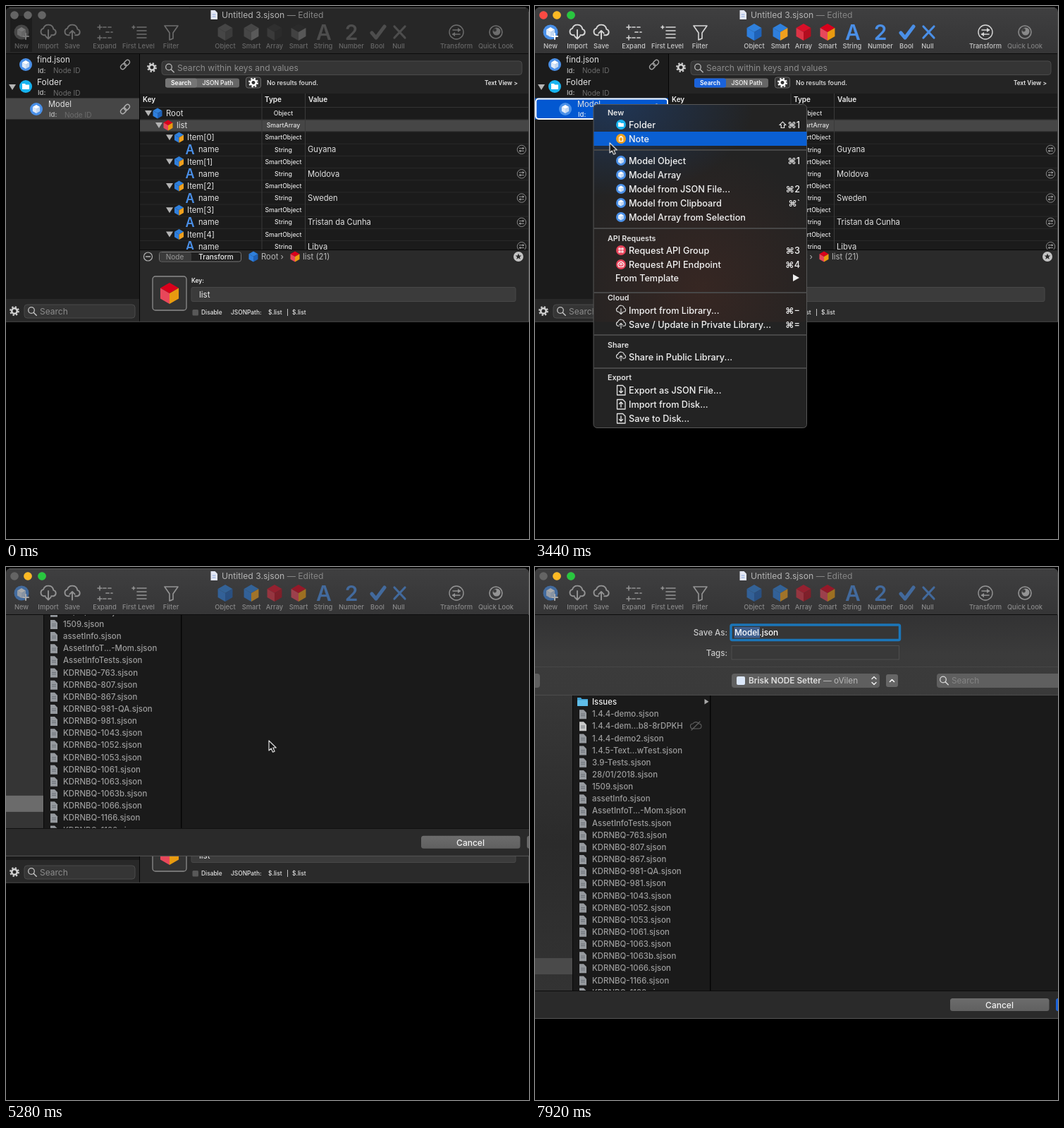
Write an HTML page that moves like this. It is 742x755 px and loops after 8000 ms.

```html
<!DOCTYPE html>
<html lang="en">
<head>
<meta charset="utf-8">
<title>Export a model</title>
<style>
html, body { margin: 0; width: 100%; height: 100%; overflow: hidden; background: #000; }
svg { display: block; width: 742px; height: 755px; font-family: Inter, "DejaVu Sans", sans-serif; white-space: pre; }

/* 1% of the loop is 80 ms */
.step { animation: 8s step-end infinite; }
.flow { animation: 8s linear infinite; }
.awake { animation-name: awake; }
.asleep { animation-name: asleep; }
.red { animation-name: red; }
.tools { animation-name: tools; }
.look { animation-name: look; }
.row { animation-name: row; }
.ring { animation-name: ring; }
.edit { animation-name: edit; }
.glow { animation-name: glow; }
.menu { animation-name: menu; }
.hover { animation-name: hover; }
.sheet { animation-name: sheet; }
.key { animation-name: key; }
.idle { animation-name: idle; }
.focus { animation-name: focus; }
.save { animation-name: save; }
.ibeam { animation-name: ibeam; }
.arrow { animation: path 8s linear infinite, arrow 8s step-end infinite; }

@keyframes awake { 0% { opacity: 0 } 14%, 100% { opacity: 1 } }
@keyframes asleep { 0% { opacity: 1 } 14%, 100% { opacity: 0 } }
@keyframes red { 0% { opacity: 0 } 14% { opacity: 1 } 64%, 100% { opacity: 0 } }
@keyframes tools {
  0% { opacity: .4; filter: grayscale(1) }
  14% { opacity: 1; filter: none }
  64%, 100% { opacity: .57; filter: none }
}
@keyframes look { 0% { opacity: 1 } 14% { opacity: .5 } 64%, 100% { opacity: 1 } }
@keyframes row { 0% { fill: #464646 } 14%, 100% { fill: #0358d1 } }
@keyframes ring { 0% { opacity: 0 } 40%, 100% { opacity: 1 } }
@keyframes edit { 0% { opacity: 0 } 21% { opacity: 1 } 30%, 100% { opacity: 0 } }
@keyframes glow {
  0%, 21% { stroke-width: 32px; stroke-opacity: .1 }
  22% { stroke-width: 19px; stroke-opacity: .32 }
  24%, 100% { stroke-width: 5px; stroke-opacity: .9 }
}
@keyframes menu { 0%, 39.99% { opacity: 0 } 40%, 56% { opacity: 1 } 58.67%, 100% { opacity: 0 } }
@keyframes hover {
  0% { opacity: 0; transform: translateY(178px) }
  43% { opacity: 1; transform: translateY(178px) }
  44% { opacity: 1; transform: translateY(229px) }
  45% { opacity: 1; transform: translateY(289px) }
  46% { opacity: 1; transform: translateY(336px) }
  47% { opacity: 1; transform: translateY(375px) }
  48% { opacity: 1; transform: translateY(440px) }
  49% { opacity: 1; transform: translateY(487px) }
  50% { opacity: 1; transform: translateY(534px) }
  54% { opacity: 0; transform: translateY(534px) }
  55%, 100% { opacity: 1; transform: translateY(534px) }
}
@keyframes sheet {
  0%, 63.5% { transform: translateY(-575px); animation-timing-function: ease-in-out }
  68%, 100% { transform: none }
}
@keyframes key { 0% { opacity: 0 } 90%, 100% { opacity: 1 } }
@keyframes idle { 0% { opacity: 1 } 90%, 100% { opacity: 0 } }
@keyframes focus {
  0%, 90% { stroke-width: 14px; stroke-opacity: .3 }
  92%, 100% { stroke-width: 3.5px; stroke-opacity: 1 }
}
@keyframes save { 0% { opacity: 0 } 99%, 100% { opacity: 1 } }
@keyframes ibeam { 0% { opacity: 0 } 20% { opacity: 1 } 30%, 100% { opacity: 0 } }
@keyframes arrow {
  0% { opacity: 0 } 3% { opacity: 1 } 20% { opacity: 0 }
  30% { opacity: 1 } 86%, 100% { opacity: 0 }
}
@keyframes path {
  0%, 3% { transform: translate(256px, 67px) }
  4%, 5% { transform: translate(237px, 67px); animation-timing-function: ease-in-out }
  12%, 20% { transform: translate(62px, 139px) }
  30% { transform: translate(66px, 131px); animation-timing-function: ease-out }
  38%, 42% { transform: translate(83px, 143px) }
  50%, 59% { transform: translate(265px, 545px); animation-timing-function: ease-in-out }
  66%, 70% { transform: translate(373px, 246px) }
  73%, 74% { transform: translate(348px, 151px) }
  75%, 76% { transform: translate(284px, 106px) }
  78% { transform: translate(304px, 92px); animation-timing-function: ease-in }
  86%, 100% { transform: translate(683px, 632px) }
}
</style>
</head>
<body>
<svg id="stage" viewBox="0 0 742 755"></svg>
<script>
const PITCH = 17.15;
const BLUE = ['#2f80dc', '#2f7fdd', '#1f62b8'];
const SMART = ['#2f80dc', '#2f7fdd', '#f0a01e'];
const RED = ['#d80f28', '#dc3446', '#b30d1f'];
const SMART_RED = ['#d9001b', '#e8475a', '#e89a10'];
const WHITE = ['#fff', '#dfeaf8', '#c3d8f2'];

// Text is placed by the middle of its capitals.
const text = (x, y, s, size, fill = '#e2e2e2', weight = 400, anchor = 'start') =>
  `<text x="${x}" y="${(y + size * .36).toFixed(2)}" font-size="${size}" fill="${fill}" font-weight="${weight}" text-anchor="${anchor}">${s}</text>`;
const mid = (x, y, s, size, fill, weight) => text(x, y, s, size, fill, weight, 'middle');
const box = (x, y, w, h, fill, r = 0, more = '') =>
  `<rect x="${x}" y="${y}" width="${w}" height="${h}" rx="${r}" fill="${fill}" ${more}/>`;
const dot = (x, y, r, fill, more = '') => `<circle cx="${x}" cy="${y}" r="${r}" fill="${fill}" ${more}/>`;
const shape = (d, fill, more = '') => `<path d="${d}" fill="${fill}" ${more}/>`;
const line = (d, stroke, width = 1.5, more = '') =>
  `<path d="${d}" fill="none" stroke="${stroke}" stroke-width="${width}" stroke-linecap="round" stroke-linejoin="round" ${more}/>`;
const at = (x, y, s, scale = 1, turn = 0) =>
  `<g transform="translate(${x} ${y}) rotate(${turn}) scale(${scale})">${s}</g>`;
const group = (cls, s, more = '') => `<g class="${cls}" ${more}>${s}</g>`;
const rule = (x, y, w, fill) => box(x, y, w, 1, fill);

const cube = (x, y, r, [top, left, right]) => at(x, y,
  shape('M0-1L.87-.5L0 0L-.87-.5z', top) +
  shape('M-.87-.5L0 0V1L-.87.5z', left) +
  shape('M.87-.5L0 0V1L.87.5z', right), r);
const badge = (x, y, r) => dot(x, y, r, '#4a90e8') + cube(x, y, r * .66, WHITE);
const folderBadge = (x, y, r) => dot(x, y, r, '#18b4f0') +
  at(x, y, shape('M-5-4h4l1 1.5h5V4H-5z', '#fff'), r / 9);
const cloud = (x, y, up, scale = 1, color = '#d8d8d8') => at(x, y,
  line('M-4 5h-2a4.6 4.6 0 0 1-.6-9A7 7 0 0 1 7-3a4.1 4.1 0 0 1 0 8H4', color, 1.8) +
  line(up ? 'M0 10V-1m-3.5 3.5L0-1l3.5 3.5' : 'M0-2v12m-3.5-3.5L0 10l3.5-3.5', color, 1.8), scale);
const swap = (x, y, r, color) => at(x, y,
  dot(0, 0, 10, 'none', `stroke="${color}" stroke-width="1.4"`) +
  line('M-5-3H5M5 3H-5', color, 1.6) +
  shape('M2-6l4.5 3L2 0zM-2 0l-4.5 3L-2 6z', color), r / 10);
const gear = (x, y, color = '#d0d0d0') =>
  dot(x, y, 3.8, 'none', `stroke="${color}" stroke-width="2.6"`) +
  dot(x, y, 5.8, 'none', `stroke="${color}" stroke-width="2.2" stroke-dasharray="2.3 2.255"`);
const lens = (x, y, color) => dot(x - 1, y - 1, 4.3, 'none', `stroke="${color}" stroke-width="1.3"`) +
  line(`M${x + 2.2} ${y + 2.2}l4 4`, color, 1.5);
const link = (x, y, color) => {
  const loop = x0 => box(x0, -3.2, 9.4, 6.4, 'none', 3.2, `stroke="${color}" stroke-width="1.5"`);
  return at(x, y, loop(-8.4) + loop(-1), .95, -45);
};
const open = (x, y) => shape(`M${x - 5} ${y - 4}h10l-5 8z`, '#b4b4b4');
const page = (x, y, fill = '#969a9f') => shape(`M${x - 5} ${y - 6}h6l4 4v9h-10z`, fill) +
  line(`M${x - 2.5} ${y}h5m-5 2.5h5`, '#6a7077', 1);

function toolbar() {
  const ink = '#d8d8d8', blue = '#4a8fe7';
  const labels = [['New', 22], ['Import', 60], ['Save', 94], ['Expand', 140], ['First Level', 188], ['Filter', 234],
    ['Object', 311], ['Smart', 348], ['Array', 381], ['Smart', 415], ['String', 450], ['Number', 490],
    ['Bool', 527], ['Null', 557], ['Transform', 639]];
  let s = labels.map(([name, x]) => mid(x, 57, name, 9.4, '#c8c8c8', 500)).join('');
  s += badge(22, 37, 10.5) + line('M28 39v8m-4-4h8', '#fff', 2);
  s += cloud(60, 36, false, 1.05) + cloud(94, 36, true, 1.05);
  s += line('M138 30h13M142 37h9M138 45h13', ink, 1.7, 'stroke-dasharray="4 3"') +
    line('M130 30h6m-3-3v6M130 45h6m-3-3v6', ink, 1.5);
  s += line('M179 30h4m-2-2v4M186 30h13M186 35h13M186 40h13M186 45h13', ink, 1.6);
  s += line('M225 28h19l-7 10v8l-5 2V38z', ink, 1.6);
  s += cube(311, 37, 12, BLUE) + cube(348, 37, 12, SMART) + cube(381, 37, 12, RED) + cube(415, 37, 12, SMART_RED);
  s += mid(451, 37, 'A', 30, blue, 600) + mid(490, 37, '2', 30, blue, 600);
  s += line('M519 38l6 7L537 29', blue, 5) + line('M551 29l15 16M566 29l-15 16', blue, 3.2);
  s += swap(639, 37, 10, ink);
  s += group('step look', mid(695, 57, 'Quick Look', 9.4, '#c8c8c8', 500) +
    dot(695, 37, 9, 'none', `stroke="${ink}" stroke-width="1.6"`) + dot(696, 36, 5.5, ink) + dot(693.5, 34, 2.4, '#444'));
  return s;
}

function titleBar() {
  const lights = [['#fc4a43', 12], ['#fdb924', 31], ['#29c73f', 51]];
  return shape('M0 8a6 6 0 0 1 6-6H736a6 6 0 0 1 6 6V67H0z', 'url(#bar)') +
    group('step asleep', shape('M0 8a6 6 0 0 1 6-6H736a6 6 0 0 1 6 6V67H0z', '#272727') + box(6, 14, 31, 51, '#1d1d1d')) +
    line('M5 2.5H737', '#5e5e5e', 1) +
    lights.map(([c, x], i) => dot(x, 13, 5.8, '#646464') + dot(x, 13, 5.8, c, `class="step ${i ? 'awake' : 'red'}"`)).join('') +
    shape('M290.5 6h6l3.5 3.5V19h-9.5z', '#e4e8f4') + line('M293 12h4m-4 3h4', '#8aa6dc', 1) +
    text(306, 13, 'Untitled 3.sjson <tspan fill="#858585">— Edited</tspan>', 12.2, '#b4b4b4') +
    group('step tools', toolbar()) + rule(0, 67, 742, '#0c0c0c');
}

function sidebar() {
  const id = (x, y) => text(x, y, 'Id:', 9.6, '#b8b8b8', 500) + text(x + 22, y, 'Node ID', 10.1, '#6c6c6c');
  return box(0, 68, 189, 347, '#1b1b1b') +
    box(0, 130.5, 189, 30, '#464646', 0, 'class="step row"') +
    badge(28, 83, 9) + text(44, 76, 'find.json', 11.5) + id(45, 91.5) + link(169, 83, '#a0a0a0') +
    open(9, 115) + folderBadge(28, 114, 9) + text(44, 108, 'Folder', 12) + id(45, 123) +
    badge(43, 146, 9) + text(60, 139, 'Model', 11.2) +
    group('step asleep', id(61, 154) + link(169, 146, '#b0b0b0')) +
    group('step awake', text(61, 154, 'Id:', 9.6, '#dfe8f8', 500) + text(82, 154, 'Node ID', 10.1, '#4b86dc') + link(169, 146, '#fff')) +
    box(1.2, 131.5, 187, 28.5, 'none', 4, 'stroke="#fff" stroke-width="2" class="step ring"') +
    box(0, 415, 189, 32, '#282828') + gear(12, 432) +
    box(26, 423, 157, 19, '#353535', 4, 'stroke="#4a4a4a"') + lens(37, 432, '#c4c4c4') + text(48, 433, 'Search', 12, '#8c8c8c') +
    box(189, 68, 1.5, 379, '#050505');
}

function finder() {
  return box(190, 68, 552, 56, '#242424') + gear(207, 87) +
    box(221, 78, 511, 19.5, '#353535', 4, 'stroke="#4a4a4a"') + lens(232, 87.5, '#b8b8b8') +
    text(243, 88, 'Search within keys and values', 12.05, '#8c8c8c') +
    box(226, 102.5, 105, 13, '#666', 3) +
    group('step asleep', box(226, 102.5, 45, 13, '#757575', 3)) +
    group('step awake', box(226, 102.5, 45, 13, '#1a62da', 3)) +
    mid(248.5, 109, 'Search', 8.5, '#fff', 600) + mid(300.5, 109, 'JSON Path', 8.5, '#e8e8e8', 600) +
    box(340.5, 101, 21, 15, '#333', 3, 'stroke="#6a6a6a"') + gear(351, 108.5, '#fff') +
    text(370, 109, 'No results found.', 8.9, '#e8e8e8', 500) + text(726, 109, 'Text View >', 8.3, '#e8e8e8', 600, 'end');
}

function table() {
  const places = ['Guyana', 'Moldova', 'Sweden', 'Tristan da Cunha', 'Libya'];
  let s = box(190, 124, 552, 222, '#1b1b1b') + rule(190, 143, 552, '#333') + box(190, 160.7, 552, 17, '#464646');
  for (let i = 0; i < 12; i++) s += rule(190, 160.5 + i * PITCH, 552, '#292929');
  s += box(362.5, 124, 1, 222, '#3a3a3a') + box(424, 124, 1, 222, '#3a3a3a');
  s += text(194, 132, 'Key', 10, '#f0f0f0', 600) + text(367, 132, 'Type', 10, '#f0f0f0', 600) + text(429, 132, 'Value', 10, '#f0f0f0', 600);
  const type = (y, name) => mid(393.5, y, name, 8.7, '#e4e4e4', 500);
  s += open(202, 152) + cube(215, 152, 7.5, BLUE) + text(227, 152, 'Root', 11.3) + type(152, 'Object');
  s += open(217, 169) + cube(230, 169, 7.5, SMART_RED) + text(242, 169, 'list', 11.3) + type(169, 'SmartArray');
  places.forEach((place, i) => {
    const y = 186.3 + i * 2 * PITCH, y2 = y + PITCH;
    s += open(232, y) + cube(245.5, y, 7.5, SMART) + text(257, y, `Item[${i}]`, 11.3) + type(y, 'SmartObject');
    s += mid(261, y2, 'A', 18, '#4a8fe7', 600) + text(273, y2, 'name', 11.2) + type(y2, 'String') +
      text(428, y2, place, 11.2) + swap(731.5, y2, 6.2, '#9a9a9a');
  });
  return group('', s, 'clip-path="url(#rows)"');
}

function inspector() {
  const star = Array.from({ length: 10 }, (_, i) => {
    const r = i % 2 ? 2 : 4.6, a = i * Math.PI / 5;
    return `${(727 + r * Math.sin(a)).toFixed(1)} ${(355 - r * Math.cos(a)).toFixed(1)}`;
  }).join('L');
  const small = (x, s) => text(x, 434, s, 8.4, '#e4e4e4', 500);
  return box(190, 345.5, 552, 101.5, '#2a2a2a') + rule(190, 345, 552, '#0a0a0a') +
    dot(201.5, 355, 6, 'none', 'stroke="#b4b4b4" stroke-width="1.2"') + line('M198.5 355h6', '#b4b4b4', 1.3) +
    box(217.5, 348.5, 116, 13.5, '#1f1f1f', 3, 'stroke="#777"') +
    group('step asleep', box(218, 349, 45, 12.5, '#3a3a3a', 2.5) + mid(239.5, 355.5, 'Node', 10, '#9a9a9a')) +
    group('step awake', box(218, 349, 45, 12.5, '#6c6c6c', 2.5) + mid(239.5, 355.5, 'Node', 10, '#fff', 500)) +
    mid(298, 355.5, 'Transform', 10, '#f2f2f2', 500) +
    cube(351, 355, 7.5, BLUE) + text(362, 355, 'Root ›', 11.3, '#b8b8b8') +
    cube(410, 355, 7.5, SMART_RED) + text(421, 355, 'list (21)', 11.4, '#b8b8b8') +
    dot(727, 355, 7, '#c4c4c4') + shape(`M${star}z`, '#2a2a2a') +
    box(208, 383, 48, 48, '#333', 4, 'stroke="#8c8c8c" stroke-width="1.3"') + cube(232, 407, 15, SMART_RED) +
    text(263, 389, 'Key:', 8.4, '#eee', 600) +
    box(263, 398.5, 460, 20, '#3b3b3b', 2, 'stroke="#484848"') + text(274, 408.5, 'list', 11.6, '#eee') +
    box(264.5, 430, 8.5, 8.5, '#585858', 1.5) + small(277, 'Disable') +
    small(319, 'JSONPath:') + small(372, '$.list') + small(398, '|') + small(406, '$.list');
}

function editor() {
  return group('step edit',
    box(58, 131, 102, 15, 'none', 2, 'stroke="#1a78b8" stroke-linejoin="round" class="flow glow"') +
    box(58, 131, 102, 15, '#141414') + box(59, 132, 34, 13.5, '#56749f') + text(60, 139, 'Model', 11.2, '#fff'));
}

function menu() {
  const file = up => y => line(`M116.5 ${y - 6.5}h8l3.5 3.5v10h-11.5z`, '#e4e4e4', 1.3) +
    line(`M122 ${y - 3}v7` + (up ? 'm-2.5-4.5l2.5-2.5 2.5 2.5' : 'm-2.5-2.5l2.5 2.5 2.5-2.5'), '#e4e4e4', 1.4);
  const model = y => badge(122, y, 7), down = y => cloud(122, y - 1, false, .65), up = y => cloud(122, y - 1, true, .65);
  const disc = (fill, d) => y => dot(122, y, 7, fill) + at(122, y, line(d, '#fff', 1.2));
  const grid = disc('#e8435a', 'M-3-3h2v2h-2zM1-3h2v2h-2zM-3 1h2v2h-2zM1 1h2v2h-2z');
  const plug = disc('#e8435a', 'M-3 3a4 4 0 1 1 6 0M-1 1a1.4 1.4 0 1 1 2 0M-3 3.5h6');
  const note = disc('#f0a01e', 'M-2.5-2h5v5.5h-5zM-1-2v-1.5h2V-2');
  const items = [
    [168, 'Folder', y => folderBadge(122, y, 7), '⇧⌘1'], [188, 'Note', note],
    [219, 'Model Object', model, '⌘1'], [239, 'Model Array', model], [259, 'Model from JSON File...', model, '⌘2'],
    [279, 'Model from Clipboard', model, '⌘`'], [299, 'Model Array from Selection', model],
    [346, 'Request API Group', grid, '⌘3'], [366, 'Request API Endpoint', plug, '⌘4'], [385, 'From Template'],
    [431, 'Import from Library...', down, '⌘−'], [451, 'Save / Update in Private Library...', up, '⌘='],
    [497, 'Share in Public Library...', up],
    [544, 'Export as JSON File...', file(false)], [564, 'Import from Disk...', file(true)], [584, 'Save to Disk...', file(false)]
  ];
  const heads = { New: 151, 'API Requests': 329, Cloud: 413, Share: 480, Export: 526 };
  return group('flow menu',
    box(83, 139.5, 302.5, 458, '#232323', 5) + box(83, 139.5, 302.5, 308, 'url(#warm)', 5) + box(83, 139.5, 302.5, 200, 'url(#cool)', 5) +
    box(83, 139.5, 302.5, 458, 'none', 5, 'stroke="#565656"') +
    [204, 315, 406, 466, 513].map(y => box(83.5, y - 1, 302, 2, '#474747')).join('') +
    box(83.5, 0, 302, 20, '#0a5fd2', 0, 'class="step hover"') +
    Object.entries(heads).map(([k, y]) => text(103, y, k, 10.7, '#e4e4e4', 600)).join('') +
    items.map(([y, s, icon, keys]) => (icon ? icon(y) : shape(`M366 ${y - 5}l9 5-9 5z`, '#eee')) +
      text(icon ? 133 : 114, y, s, 12.7, '#f2f2f2', 500) +
      (keys ? text(376, y, keys, 12.7, '#f2f2f2', 500, 'end') : '')).join(''));
}

function sheetHead() {
  const app = fill => box(286, 155, 12, 12, fill, 2);
  const arrows = color => line('M478 158.5l3-3 3 3M478 163.5l3 3 3-3', color, 1.4);
  const pills = fill => box(-10, 151, 17, 20, fill, 4) + box(279, 151, 210, 20, fill, 4) + box(570, 151, 190, 20, fill, 4);
  const label = (y, s) => text(273, y, s, 11.6, '#c8c8c8', 500, 'end');
  const field = y => box(279, y, 237.5, 19.5, '#393939', 0, 'stroke="#4e4e4e"');
  return box(0, 67, 742, 114, 'url(#head)') +
    group('step idle', box(0, 67, 290, 114, 'url(#tint)')) +
    rule(0, 141, 742, '#464646') + rule(0, 181, 742, '#4c4c4c') +
    label(93, 'Save As:') + label(121.5, 'Tags:') + field(83) + field(111.5) +
    group('step key',
      box(278, 82, 239.5, 21.5, '#363636', 2, 'stroke="#1b76b9" class="flow focus"') + box(282.5, 85, 36.5, 15.5, '#40608f')) +
    text(283, 93, 'Model.json', 11.8, '#fff', 500) +
    group('step idle', pills('#484848') + app('#a8a8a8') + arrows('#9a9a9a') + lens(580, 160.5, '#858585')) +
    group('step key', pills('#5f5f5f') + app('#dce8fa') + arrows('#f0f0f0') + lens(580, 160.5, '#d8d8d8')) +
    text(303, 161, 'Brisk NODE Setter <tspan fill="#b8b8b8" font-weight="400">— oVilen</tspan>', 11.8, '#dedede', 600) +
    box(498, 152, 17, 18, '#666', 3) + line('M503.5 162.5l3-3 3 3', '#fff', 1.5) +
    text(591, 161, 'Search', 11.8, '#858585');
}

function sheet() {
  const codes = [763, 807, 867, '981-QA', 981, 1043, 1052, 1053, 1061, 1063, '1063b', 1066, 1166, 1189];
  const files = ['1.4.4-demo.sjson', '1.4.4-dem...b8-8rDPKH', '1.4.4-demo2.sjson', '1.4.5-Text...wTest.sjson', '3.9-Tests.sjson',
    '28/01/2018.sjson', '1509.sjson', 'assetInfo.sjson', 'AssetInfoT...-Mom.sjson', 'AssetInfoTests.sjson',
    ...codes.map(n => `KDRNBQ-${n}.sjson`)];
  const list = files.map((name, i) => {
    const y = 191 + (i + 1) * PITCH;
    return page(68, y, i === 1 ? '#c9c9c9' : undefined) + text(81, y, name, 11.4, '#9c9c9c', 500);
  }).join('');
  const s = box(0, 67, 742, 572.5, '#2a2a2a') + sheetHead() +
    box(0, 182, 53, 418, '#353535') + box(0, 554, 53, 23, '#6b6b6b') +
    group('step key', box(0, 182, 53, 418, 'url(#side)') + box(0, 554, 53, 23, '#4a4a4a')) +
    box(53, 182, 689, 418, '#1a1a1a') + box(53, 182, 1, 418, '#080808') + box(248, 182, 1.5, 418, '#050505') +
    group('', shape('M60 185h5l1.5 2H75v10H60z', '#3f9fd0') + box(60, 188.5, 15, 8.5, '#5fbde8', 1) +
      text(81, 191, 'Issues', 11.4, '#f0f0f0', 500) + shape('M240.5 187l6 3.7-6 3.7z', '#a8a8a8') + list +
      line('M224 229a3.5 3.5 0 0 1 0-7 5 5 0 0 1 8.5 0 3.5 3.5 0 0 1 0 7zM222 231l12-12', '#626262', 1.1), 'clip-path="url(#files)"') +
    rule(0, 600, 742, '#0c0c0c') + rule(0, 639, 742, '#555') +
    box(589, 611, 140.5, 18, 'url(#button)', 3.5) + mid(659, 620.5, 'Cancel', 12, '#f2f2f2', 500) +
    box(739, 611, 30, 18, '#666', 3.5) + box(739, 611, 30, 18, '#1a62da', 3.5, 'class="step save"');
  return group('', group('flow sheet', s), 'clip-path="url(#below)"');
}

const fade = (id, ...colors) => `<linearGradient id="${id}" x2="0" y2="1">` +
  colors.map((c, i) => `<stop offset="${i / (colors.length - 1)}" stop-color="${c}"/>`).join('') + '</linearGradient>';
const haze = (id, cx, cy, color, alpha) => `<radialGradient id="${id}" cx="${cx}" cy="${cy}" r=".65">` +
  `<stop stop-color="${color}" stop-opacity="${alpha}"/><stop offset="1" stop-color="${color}" stop-opacity="0"/></radialGradient>`;
const clip = (id, x, y, w, h) => `<clipPath id="${id}">${box(x, y, w, h, '#000')}</clipPath>`;

document.getElementById('stage').innerHTML =
  `<defs>${fade('bar', '#3f3f40', '#353536')}${fade('head', '#323233', '#3b3b3b', '#3a3a3a')}` +
  `${fade('side', '#383838', '#2b2b2b', '#333')}${fade('button', '#6c6c6c', '#606060')}` +
  `${haze('cool', .1, 0, '#1f3c66', .75)}${haze('warm', .5, .85, '#4a2a22', .5)}${haze('tint', .25, .65, '#1f3a60', .8)}` +
  `${clip('rows', 190, 124, 552, 221)}${clip('files', 54, 182, 194, 418)}${clip('below', 0, 68, 742, 687)}` +
  `${clip('window', 0, 0, 742, 447.5)}</defs>` +
  group('', titleBar() + sidebar() + finder() + table() + inspector() +
    rule(0, 446.7, 742, '#4e4e4e') + box(741, 8, 1, 439, '#4a4a4a'), 'clip-path="url(#window)"') +
  editor() + menu() + sheet() +
  group('step ibeam', line('M72 123.5q3 0 3 2.5v10q0 2.5-3 2.5M78 123.5q-3 0-3 2.5M78 138.5q-3 0-3-2.5M73 132.5h4', '#b4c4d4', 1.3)) +
  group('arrow', shape('M0 0v14l3.2-3 2.3 5.2 2.6-1.1-2.3-5.1h4.4z', '#141414', 'stroke="#dcdcdc" stroke-width="1.2" stroke-linejoin="round"'));
</script>
</body>
</html>
```
